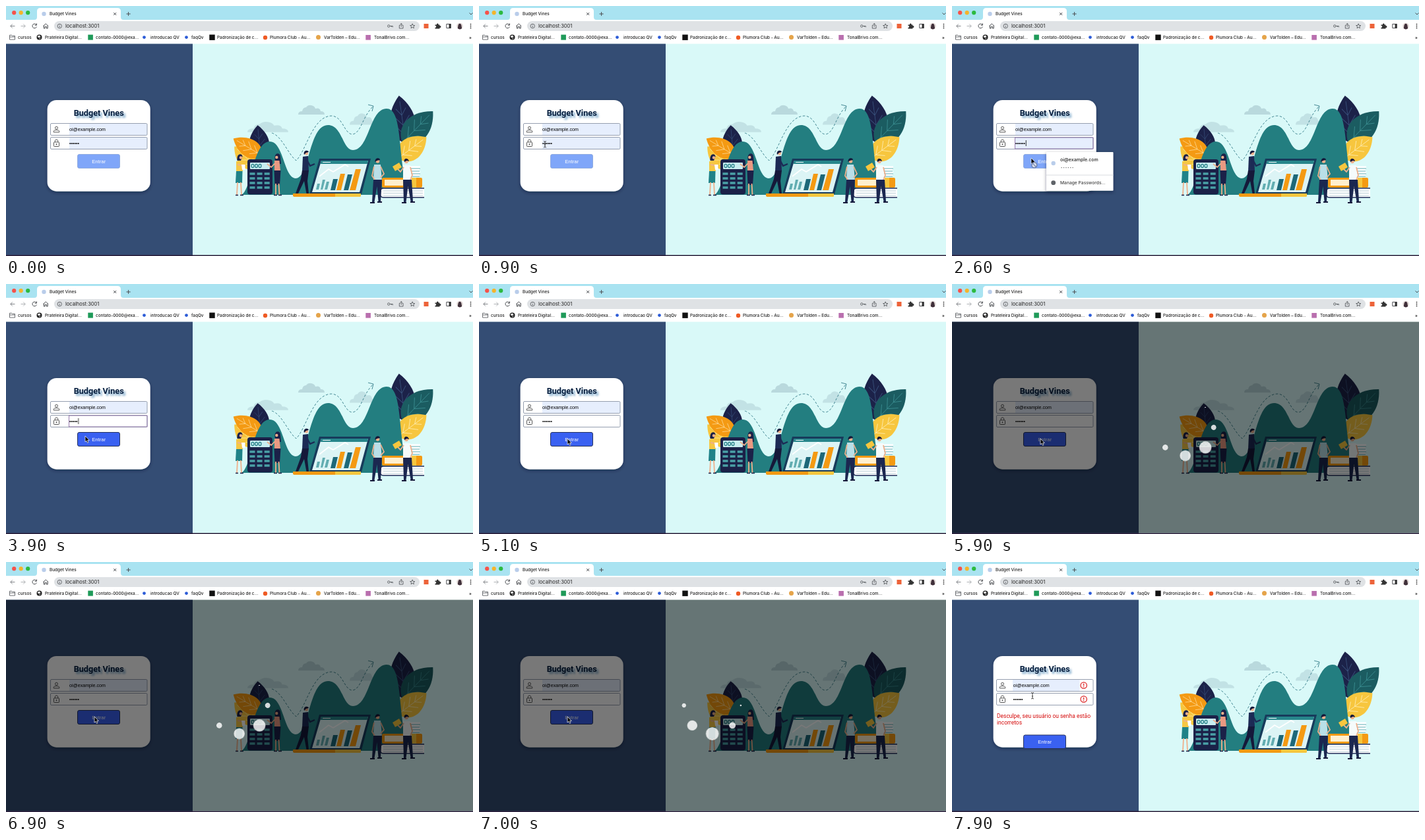
Recreate the animation shown at these times as an HTML page. Size 708x380 px, loop 8 s.

```html
<!DOCTYPE html>
<html lang="pt-BR">
<head>
<meta charset="utf-8">
<title>Login</title>
<style>
html, body { margin: 0; width: 100%; height: 100%; overflow: hidden; background: #d9f9f8; }
svg { display: block; }
text { white-space: pre; }
.ui { font: 500 6.4px Inter, sans-serif; fill: #222; }
.field { font: 7.1px "Liberation Sans", Arial, sans-serif; fill: #000; }
.label { font: 7.7px "Liberation Sans", Arial, sans-serif; fill: #fff; text-anchor: middle; }
.heading { font: 700 12.7px Roboto, sans-serif; fill: #071f3f; text-anchor: middle; text-shadow: 3px 3px 3px rgba(60,125,175,.7); }
.alert { font: 8.47px Roboto, sans-serif; fill: #d50b0b; }
.line { fill: none; stroke: #4a4d51; stroke-width: 1; }

.pre, .err, .light, .blue, .auto, .menu, .focus, .caret, .tail, .veil, .deny, .beam, .arrow {
  animation: 8s step-end infinite;
}
.pre { animation-name: pre; }
.err { animation-name: err; }
.light, .auto { animation-name: untouched; }
.blue { animation-name: touched; }
.menu { animation-name: menu; }
.focus { animation-name: focus; }
.caret { animation-name: blink; }
.tail { animation-name: retype; }
.veil { animation-name: veil; }
.deny { animation-name: deny; }
.beam { animation-name: beam; }
.arrow { animation-name: arrow; }
.cursor { animation: move 8s ease-in-out infinite; }
@keyframes pre { 0% { opacity: 1 } 90.625%, 100% { opacity: 0 } }
@keyframes err { 0% { opacity: 0 } 90.625%, 100% { opacity: 1 } }
@keyframes untouched { 0% { opacity: 1 } 48.125%, 100% { opacity: 0 } }
@keyframes touched { 0% { opacity: 0 } 48.125%, 100% { opacity: 1 } }
@keyframes menu { 0% { opacity: 0 } 18.125% { opacity: 1 } 48.125%, 100% { opacity: 0 } }
@keyframes focus { 0% { opacity: 0 } 16.875% { opacity: 1 } 63.125%, 100% { opacity: 0 } }
@keyframes blink {
  0%, 23.125%, 35.625%, 54.375%, 63.125%, 100% { opacity: 0; transform: none }
  16.875%, 29.375%, 41.875%, 50.625%, 60.625% { opacity: 1; transform: none }
  48.125% { opacity: 1; transform: translateX(-2.5px) }
}
@keyframes retype { 0%, 50.625%, 100% { opacity: 1 } 48.125% { opacity: 0 } }
@keyframes veil { 0% { opacity: 0 } 64.6875% { opacity: 1 } 90.625%, 100% { opacity: 0 } }
@keyframes deny { 0% { opacity: 0 } 30% { opacity: 1 } 48.125%, 100% { opacity: 0 } }
@keyframes beam { 0% { opacity: 0 } 8.5% { opacity: 1 } 28.5% { opacity: 0 } 96%, 100% { opacity: 1 } }
@keyframes arrow { 0% { opacity: 1 } 8.5% { opacity: 0 } 28.5% { opacity: 1 } 96%, 100% { opacity: 0 } }
@keyframes move {
  0%, 4% { transform: translate(240px, 395px) }
  10%, 27.5% { transform: translate(100px, 210px) }
  31%, 58% { transform: translate(120px, 231px) }
  61.25%, 94% { transform: translate(134px, 235px) }
  98.5%, 100% { transform: translate(122px, 203px) }
}
/* Each bubble waits for its first turn, then pulses once a second. */
.gate { animation: veil 8s step-end calc(var(--k) * .125s) infinite; opacity: 0; }
.bubble { animation: pulse 1s cubic-bezier(.2,.2,.4,.8) calc(var(--k) * .125s - 1.825s) infinite; }
@keyframes pulse { 0%, 66.667%, 100% { transform: scale(0) } 33.333% { transform: scale(1) } }
</style>
</head>
<body>
<svg width="708" height="380" viewBox="0 0 708 380">
  <defs>
    <filter id="shadow" x="-20%" y="-20%" width="140%" height="150%">
      <feDropShadow dx="0" dy="2" stdDeviation="2.5" flood-color="#07142c" flood-opacity=".45"/>
    </filter>
    <g id="user" fill="none" stroke="#444" stroke-width=".9"><circle r="2" cy="-2.2"/><path d="M-4.3 4.3V3C-4.3 .4 4.3 .4 4.3 3V4.3Z"/></g>
    <g id="lock" fill="none" stroke="#444" stroke-width=".9"><rect x="-4" y="-1.6" width="8" height="6.6" rx=".8"/><path d="M-2.2-1.6V-3.4C-2.2-6.2 2.2-6.2 2.2-3.4V-1.6"/><circle r=".6" cy="1.7" fill="#444"/></g>
    <g id="warn" stroke="#dc1f1f" fill="none" stroke-width="1.2"><circle r="4.7"/><path d="M0-2.7V.7M0 1.6V2.7"/></g>
    <path id="cloud" d="M-20 7Q-20 2-14 2Q-13-4-8-4Q-5-8 0-7Q5-6 6-2Q13-4 14 2Q20 2 20 7Z"/>
    <path id="leaf" d="M0 0C-27-12-27-44 0-68C27-44 27-12 0 0Z"/>
    <path id="vein" d="M0 0V-60M0-12L-11-25M0-12L11-25M0-26L-12-39M0-26L12-39M0-40L-8-50M0-40L8-50" fill="none" stroke-width=".9"/>
  </defs>

  <!-- browser -->
  <rect width="708" height="58" fill="#fff"/>
  <rect width="708" height="21" fill="#a9e3f1"/>
  <circle cx="12.2" cy="10.2" r="3.1" fill="#f6534a"/><circle cx="22.7" cy="10.2" r="3.1" fill="#f5b42b"/><circle cx="33.2" cy="10.2" r="3.1" fill="#2cba40"/>
  <path d="M43 21Q47 21 47 17V8Q47 3 52 3H169Q174 3 174 8V17Q174 21 178 21Z" fill="#fff"/>
  <circle cx="57.5" cy="12" r="3.2" fill="#b9cdea"/>
  <text class="ui" x="66" y="14.4" style="font-size:6.4px">Budget Vines</text>
  <path class="line" d="M163.2 10L167.2 14M167.2 10L163.2 14M182.5 12H188.7M185.6 9V15M702.5 10.5L705 13L707.5 10.5"/>
  <g class="line">
    <path d="M13.5 30.5H6.8M9.8 27.5L6.8 30.5L9.8 33.5" stroke="#85888c"/>
    <path d="M22.5 30.5H29.2M26.2 27.5L29.2 30.5L26.2 33.5" stroke="#b0b3b6"/>
    <path d="M46 28.5A3.3 3.3 0 1 0 46.4 31.6M46.4 26.5V29.2H43.7"/>
    <path d="M56.5 30.5L60.3 27L64.1 30.5M57.4 29.8V34H59.2V31.4H61.4V34H63.2V29.8"/>
  </g>
  <rect x="73" y="23" width="554" height="15" rx="7.5" fill="#dfe2e5"/>
  <g class="line" style="stroke-width:.8"><circle cx="81.3" cy="30.5" r="3.2"/><path d="M81.3 30V32.4M81.3 28.4V29.1"/>
    <circle cx="580.2" cy="30.5" r="1.7"/><path d="M582 30.5H586.3V32.3M584.4 30.5V32"/>
    <path d="M597.8 29.3H596.3V34H602V29.3H600.5M599.2 31.8V26.5M597.5 28.2L599.2 26.5L600.9 28.2"/>
    <path d="M616.2 26.9L617.2 29.4L619.8 29.6L617.8 31.2L618.4 33.7L616.2 32.3L614 33.7L614.6 31.2L612.6 29.6L615.2 29.4Z"/></g>
  <text class="ui" x="90" y="33.3" style="font-size:7.5px;font-weight:400">localhost:3001</text>
  <rect x="633.5" y="27" width="7" height="7" fill="#ed6339"/>
  <path d="M650.5 28.5H653A1.4 1.4 0 1 1 655.5 28.5H657.5V30.2A1.4 1.4 0 1 1 657.5 32.8V34.5H650.5V32.7A1.3 1.3 0 1 0 650.5 30.2Z" fill="#333"/>
  <path d="M667.8 27.5H674.2V33.5H667.8Z" class="line"/><path d="M671.5 27H674.5V34H671.5Z" fill="#333"/>
  <circle cx="688" cy="30.5" r="4.8" fill="#e3dad8"/><path d="M684.8 34C685.4 31 685.4 26.7 688 26.7C690.6 26.7 690.6 31 691.2 34A4.8 4.8 0 0 1 684.8 34Z" fill="#40303a"/>
  <g fill="#333"><circle cx="704.5" cy="27.6" r=".9"/><circle cx="704.5" cy="30.5" r=".9"/><circle cx="704.5" cy="33.4" r=".9"/></g>
  <path class="line" d="M5.5 44.3H8.7L9.7 45.4H13.5V51H5.5ZM5.5 47H13.5" style="stroke-width:.8"/>
  <circle cx="50.5" cy="47.6" r="4" fill="#222"/><path d="M48 46L51 45L52 47L49.5 48ZM50 50L52.5 49" stroke="#fff" fill="#fff" stroke-width=".7"/>
  <rect x="124.3" y="43.6" width="7.6" height="8" fill="#1e9a59"/>
  <circle cx="209.5" cy="47.6" r="2.4" fill="#2b5bd7"/><circle cx="273.5" cy="47.6" r="2.4" fill="#2b5bd7"/>
  <rect x="308.3" y="43.5" width="8.4" height="8.4" fill="#111"/>
  <circle cx="393" cy="48" r="3.2" fill="#ef5a24"/><circle cx="473.5" cy="47.6" r="3.5" fill="#e5a44a"/>
  <rect x="545.3" y="44" width="7.6" height="7.6" fill="#b96fae"/>
  <g class="ui" id="marks"></g>

  <!-- page -->
  <rect y="57.5" width="708" height="322" fill="#d9f9f8"/>
  <rect y="57.5" width="283" height="322" fill="#344d74"/>

  <!-- illustration -->
  <g fill="#b9d9dd"><use href="#cloud" x="463" y="158"/><g opacity=".7"><use href="#cloud" transform="translate(397 184) scale(1.55 1.1)"/><use href="#cloud" transform="translate(541 172) scale(1 1.2)"/></g></g>
  <g>
    <g transform="translate(606 209) rotate(-8) scale(.95 1.08)"><use href="#leaf" fill="#1c2249"/><use href="#vein" stroke="#38517b"/></g>
    <g transform="translate(601 208) rotate(44) scale(.95 .98)"><use href="#leaf" fill="#1b5c61"/><use href="#vein" stroke="#3a8d90"/></g>
    <g transform="translate(594 232) rotate(53) scale(.85 .8)"><use href="#leaf" fill="#f7c63e"/><use href="#vein" stroke="#fff0b8"/></g>
    <g transform="translate(386 232) rotate(-5) scale(.75)"><use href="#leaf" fill="#1c2249"/><use href="#vein" stroke="#38517b"/></g>
    <g transform="translate(382 247) rotate(-47) scale(.7 .72)"><use href="#leaf" fill="#f7c63e"/><use href="#vein" stroke="#fff0b8"/></g>
    <g transform="translate(389 228) rotate(-59) scale(.68 .76)"><use href="#leaf" fill="#f49a13"/><use href="#vein" stroke="#ffe0a4"/></g>
  </g>
  <path d="M357 287C373 278 374 206 400 206C421 206 421 261 439 262C460 262 459 181 488 181C510 181 510 219 526 219C551 219 551 156 577 156C604 156 592 240 612 287Z" fill="#237e80"/>
  <path d="M403 193C418 197 428 226 440 235C456 218 465 168 493 167C511 167 512 194 525 195C538 194 540 169 556 153" fill="none" stroke="#367d8a" stroke-width=".9" stroke-dasharray="3.5 2.5"/>
  <path d="M549 150L557 152L555 160" fill="none" stroke="#367d8a" stroke-width=".9"/>

  <rect x="366" y="233" width="38" height="53.5" rx="4" fill="#1b2148"/>
  <rect x="370" y="238" width="30" height="10" rx="1" fill="#c8edf0"/>
  <g fill="none" stroke="#217d85" stroke-width="1.2"><ellipse cx="374" cy="243" rx="1.9" ry="2.7"/><ellipse cx="379.5" cy="243" rx="1.9" ry="2.7"/><ellipse cx="385" cy="243" rx="1.9" ry="2.7"/></g>
  <path d="M369.5 255H400M369.5 262H400M369.5 269H400M369.5 276H400" stroke="#4aa1a7" stroke-width="3.6" stroke-dasharray="8 3.1"/>

  <!-- woman by the calculator -->
  <path d="M350.5 235C349 224 358 223 358.5 229L356 235Z" fill="#1b2148"/><circle cx="356" cy="230.5" r="2.2" fill="#eeb08c"/>
  <path d="M349 236L357 235L359 251H349Z" fill="#f6c744"/><path d="M351 241L361 243L361 248" stroke="#eeb08c" stroke-width="1.8" fill="none"/><path d="M357 241H362.5V249H358Z" fill="#fff"/>
  <path d="M349 251H358.5L358 269H348Z" fill="#1f8288"/><path d="M351 268L350 287M356 268L357 287" stroke="#eeb08c" stroke-width="1.8"/><path d="M348 287.5H352M355 287.5H360" stroke="#1b2148" stroke-width="1.5"/>
  <!-- woman pointing -->
  <path d="M408 235C405 222 416 222 416 229L417 240H411Z" fill="#1b2148"/><circle cx="410.3" cy="230" r="2.2" fill="#eeb08c"/>
  <path d="M407 235H414.5L416 251H407Z" fill="#e99982"/><path d="M408 239L402 245L396 240" stroke="#eeb08c" stroke-width="1.7" fill="none"/>
  <path d="M406.5 250H416.5L415 272H407.5Z" fill="#1b2148"/><path d="M409 270V287M413.5 270L414.5 287" stroke="#eeb08c" stroke-width="1.8"/><path d="M406 287.5H411M413 287.5H418" stroke="#1b2148" stroke-width="1.5"/>
  <!-- man leaning -->
  <circle cx="455.5" cy="224" r="2.6" fill="#eeb08c"/><path d="M452 226C450 219 458 218 459 222L455 223Z" fill="#15193a"/>
  <path d="M450 229L458 228L459 251L449 252Z" fill="#1c2a55"/><path d="M455 232L461 243L468 240" stroke="#1c2a55" stroke-width="2.4" fill="none"/>
  <path d="M449 250H459L457 266L459 285H455.5L452 266L443 285H439L447 263Z" fill="#15193a"/><path d="M437 286H443M454 286H461" stroke="#15193a" stroke-width="1.8"/>

  <!-- laptop -->
  <path d="M475 232H553L539 286H460Z" fill="#173b5b"/><path d="M478 235H549L536 283H464Z" fill="#dcf4f5"/>
  <path d="M478 235H549L547.7 240H476.5Z" fill="#27868b"/><path d="M480 237.5H492" stroke="#fff"/>
  <path d="M475 259L489 248L496 252L514 241L519 244" fill="none" stroke="#fff" stroke-width="1.8"/>
  <path d="M470 279L472 270H476L474 279ZM477 279L480 264H484L480 279ZM483 279L486 267H490L487 279Z" fill="#62adb1"/>
  <path d="M492 280L496 263H503L499 280ZM512 280L518 256H525L519 280Z" fill="#1d6879"/>
  <path d="M501 280L507 255H514L508 280ZM521 280L530 248H538L530 280Z" fill="#f49a13"/>
  <path d="M435 285H538V288Q538 290 535 290H438Q435 290 435 288Z" fill="#f49a13"/><path d="M499 285H538V288Q538 290 535 290H499Z" fill="#f7c63e"/>

  <!-- books -->
  <path d="M612 245H628M609 249H627M612 253H628M610 257H627" stroke="#fff" stroke-width="3"/><path d="M612 247H628M609 251H627M612 255H628M610 259H627" stroke="#559da5" stroke-width=".8"/>
  <rect x="570" y="261" width="61" height="15" rx="2" fill="#f49a13"/><path d="M574 264H602V273H574Z" fill="#fff0ce"/><path d="M604 261H622V276H604Z" fill="#f7c63e"/>
  <path d="M634 277H572Q567 277 567 284T572 291H634" fill="#fff" stroke="#1c2a55" stroke-width="1.4"/><path d="M572 281H632M572 284.5H632M572 288H632" stroke="#aac5cd" stroke-width=".8"/>
  <!-- men by the books -->
  <circle cx="563.5" cy="236" r="2.8" fill="#eeb08c"/><path d="M559.5 237C559 230 567 230 567 234L562.5 235Z" fill="#15193a"/>
  <path d="M558 241H568L570 266H557Z" fill="#b9dfe8"/><path d="M568 244L573 255L568 261M558 244L555 258L559 264" stroke="#eeb08c" stroke-width="1.8" fill="none"/>
  <path d="M557 264H570L568 297H564.5L562.5 274L558.5 298H555Z" fill="#1b2750"/><path d="M552 299H559M563 298H570" stroke="#15193a" stroke-width="1.8"/>
  <circle cx="607" cy="236.5" r="2.8" fill="#eeb08c"/><path d="M604 237C602 231 610 230 611 236L608 235Z" fill="#15193a"/>
  <path d="M602 242H613L615 266H602Z" fill="#f5fbfb"/><path d="M603 245L598 252L593 247M613 245L616 257L613 264" stroke="#eeb08c" stroke-width="1.8" fill="none"/><path d="M586 244L596 238L600 245L590 251Z" fill="#f7c63e"/>
  <path d="M602 264H615L617 297H613.5L609.5 274L606.5 298H603Z" fill="#1b2750"/><path d="M600 299H607M613 298H620" stroke="#15193a" stroke-width="1.8"/>

  <!-- login card -->
  <rect x="62.7" y="143" width="156" height="138.7" rx="14" fill="#fff" filter="url(#shadow)"/>
  <text class="heading" x="140.7" y="167.2">Budget Vines</text>
  <g class="pre">
    <rect x="96" y="179" width="118" height="17.5" fill="#e6eefd"/>
    <rect class="auto" x="96" y="200" width="118" height="17.5" fill="#e6eefd"/>
    <text class="field" x="96" y="190">oi@example.com</text>
    <text class="field" x="96" y="211">•••••<tspan class="tail">•</tspan></text>
  </g>
  <g class="err">
    <rect x="92" y="179" width="101.5" height="17.5" fill="#e6eefd"/>
    <text class="field" x="92.7" y="190">oi@example.com</text>
    <text class="field" x="92.7" y="211">••••••</text>
    <use href="#warn" x="199.7" y="187.5"/><use href="#warn" x="199.7" y="208.5"/>
    <text class="alert" x="68" y="236.6">Desculpe, seu usuário ou senha estão</text>
    <text class="alert" x="68" y="246.6">incorretos</text>
  </g>
  <g fill="none" stroke="#8a93a6" stroke-width=".9"><rect x="67.5" y="178.5" width="146.5" height="18" rx="1.5"/><rect x="67.5" y="199.5" width="146.5" height="18" rx="1.5"/></g>
  <rect class="focus" x="95.5" y="200" width="118.5" height="17" fill="none" stroke="#8d6fa6" stroke-width=".9"/>
  <rect class="caret" x="111.8" y="204" width=".8" height="9" fill="#000"/>
  <use href="#user" x="76.5" y="187.5"/><use href="#lock" x="76.5" y="208.5"/>
  <g class="pre">
    <rect class="light" x="108.5" y="225.5" width="64" height="21" rx="2.5" fill="#7fa6f9" stroke="#86a2d8" stroke-width=".8"/>
    <rect class="blue" x="108.5" y="225.5" width="64" height="21" rx="2.5" fill="#3a61f1" stroke="#27335d"/>
    <text class="label" x="140.6" y="238.8">Entrar</text>
  </g>
  <g class="err">
    <rect x="108.5" y="263" width="64" height="20.5" rx="2.5" fill="#3a61f1" stroke="#27335d"/>
    <text class="label" x="140.6" y="276">Entrar</text>
  </g>

  <g class="menu">
    <rect x="143" y="222" width="101.5" height="58.7" rx="1" fill="#fff" filter="url(#shadow)"/>
    <path d="M143 257H244.5" stroke="#dadce0"/>
    <circle cx="153.7" cy="239" r="3.2" fill="#b9cdea"/><circle cx="153.7" cy="268.7" r="3.4" fill="#5f6368"/>
    <text class="ui" x="164" y="236.2" style="font-size:7px">oi@example.com</text>
    <path d="M165.5 245.6H184" stroke="#777" stroke-width="1.3" stroke-dasharray="1.3 2.1"/>
    <text class="ui" x="164" y="271.3" style="font-size:6.7px;fill:#444">Manage Passwords...</text>
  </g>

  <g class="veil">
    <rect y="57.5" width="708" height="321" fill="#000" fill-opacity=".53"/>
    <g id="spinner" transform="translate(353.7 218)" fill="#fff" fill-opacity=".82"></g>
  </g>
  <rect y="378.5" width="708" height="1.5" fill="#2a1d38"/>

  <g class="cursor">
    <path class="beam" d="M-2-4.5Q0-4.5 0-3Q0-4.5 2-4.5M0-3V3.5M-2 5Q0 5 0 3.5Q0 5 2 5M-1 1H1" fill="none" stroke="#222" stroke-width=".8"/>
    <path class="arrow" d="M0 0V9L2 7.2L3.5 10.4L5 9.7L3.6 6.6H6.4Z" fill="#000" stroke="#fff" stroke-width=".7"/>
    <g class="deny" transform="translate(4.7 10.8)"><circle r="4" fill="#dfe6f4" stroke="#5b6c94" stroke-width="1.2"/><path d="M-2.8-2.8L2.8 2.8" stroke="#5b6c94" stroke-width="1.2"/></g>
  </g>
</svg>
<script>
const ns = "http://www.w3.org/2000/svg";
function add(parent, tag, attrs, text = "") {
  const el = document.createElementNS(ns, tag);
  for (const key in attrs) el.setAttribute(key, attrs[key]);
  el.textContent = text;
  return parent.appendChild(el);
}

const marks = document.getElementById("marks");
[[18, "cursos"], [59, "Prateleira Digital..."], [136, "contato-0000@exa..."], [219, "introducao QV"], [281, "faqQv"],
 [320, "Padronização de c..."], [400, "Plumora Club - Au..."], [482, "VarTolden – Edu..."], [558, "TonalBrivo.com..."], [702, "»"]]
  .forEach(([x, name]) => add(marks, "text", { x, y: 50 }, name));

const spinner = document.getElementById("spinner");
for (let k = 0; k < 8; k++) {
  const arm = add(spinner, "g", { transform: `rotate(${k * 45}) translate(0 -43)`, style: `--k:${k}` });
  const gate = add(arm, "g", { class: "gate" });
  add(gate, "circle", { class: "bubble", r: 9.9 });
}
</script>
</body>
</html>
```
